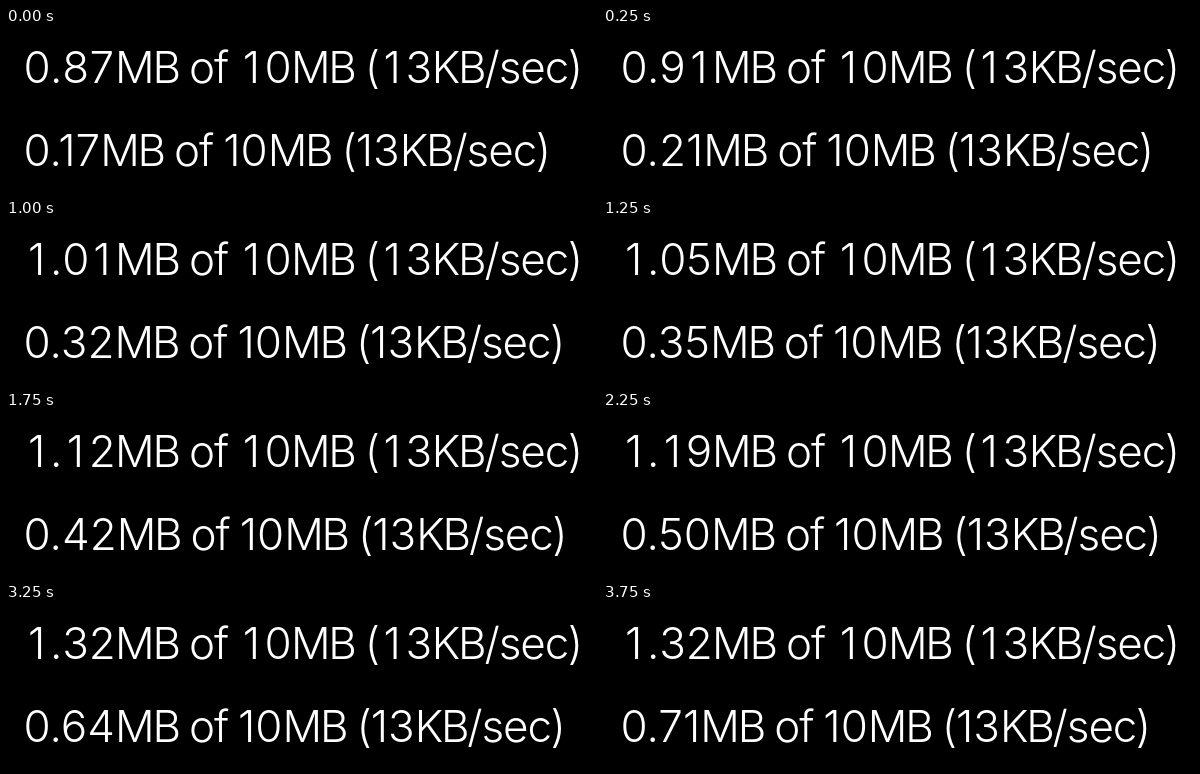
An HTML page for the animation above (4000 ms loop, 591 by 164 pixels).

```html
<!DOCTYPE html>
<html lang="en">
<head>
<meta charset="utf-8">
<title>Download progress</title>
<style>
  html, body { margin: 0; width: 100%; height: 100%; overflow: hidden; background: #000; }
  p {
    position: absolute;
    left: 17.5px;
    margin: 0;
    color: #fff;
    font: 340 44px/44px Inter, sans-serif;
    font-optical-sizing: none;
    letter-spacing: -0.025em;
    word-spacing: -0.027em;
    white-space: pre;
  }
  #fixed { top: 17px; }
  #flowing { top: 100px; }
  .number { letter-spacing: 0; }
  .unit { letter-spacing: -0.05em; }
  .digit { display: inline-block; width: 0.6em; text-align: center; }
</style>
</head>
<body>
<p id="fixed"></p>
<p id="flowing"></p>
<script>
  const LOOP = 4000, STEP = 250;
  const fixed = document.getElementById('fixed');
  const flowing = document.getElementById('flowing');

  const number = text => `<span class="number">${text}</span>`;
  const unit = text => `<span class="unit">${text}</span>`;
  // Equal-width cells keep the rest of the line still while digits change.
  const inCells = text => text.replace(/\d/g, '<span class="digit">$&</span>');

  function label(amount, digits = text => text) {
    const size = (value, name) => number(digits(value)) + unit(name);
    return `${size(amount.toFixed(2), 'MB')} of ${size('10', 'MB')} (${size('13', 'KB')}/sec)`;
  }

  const start = performance.now();
  let shown = -1;

  function draw(now) {
    const step = Math.floor((Math.max(0, now - start) % LOOP) / STEP);
    if (step !== shown) {
      shown = step;
      // The first download stalls near the end of the loop.
      fixed.innerHTML = label(0.8747 + 0.0345 * Math.min(step, 13), inCells);
      flowing.innerHTML = label(0.1712 + 0.03598 * step);
    }
    requestAnimationFrame(draw);
  }
  draw(start);
</script>
</body>
</html>
```
